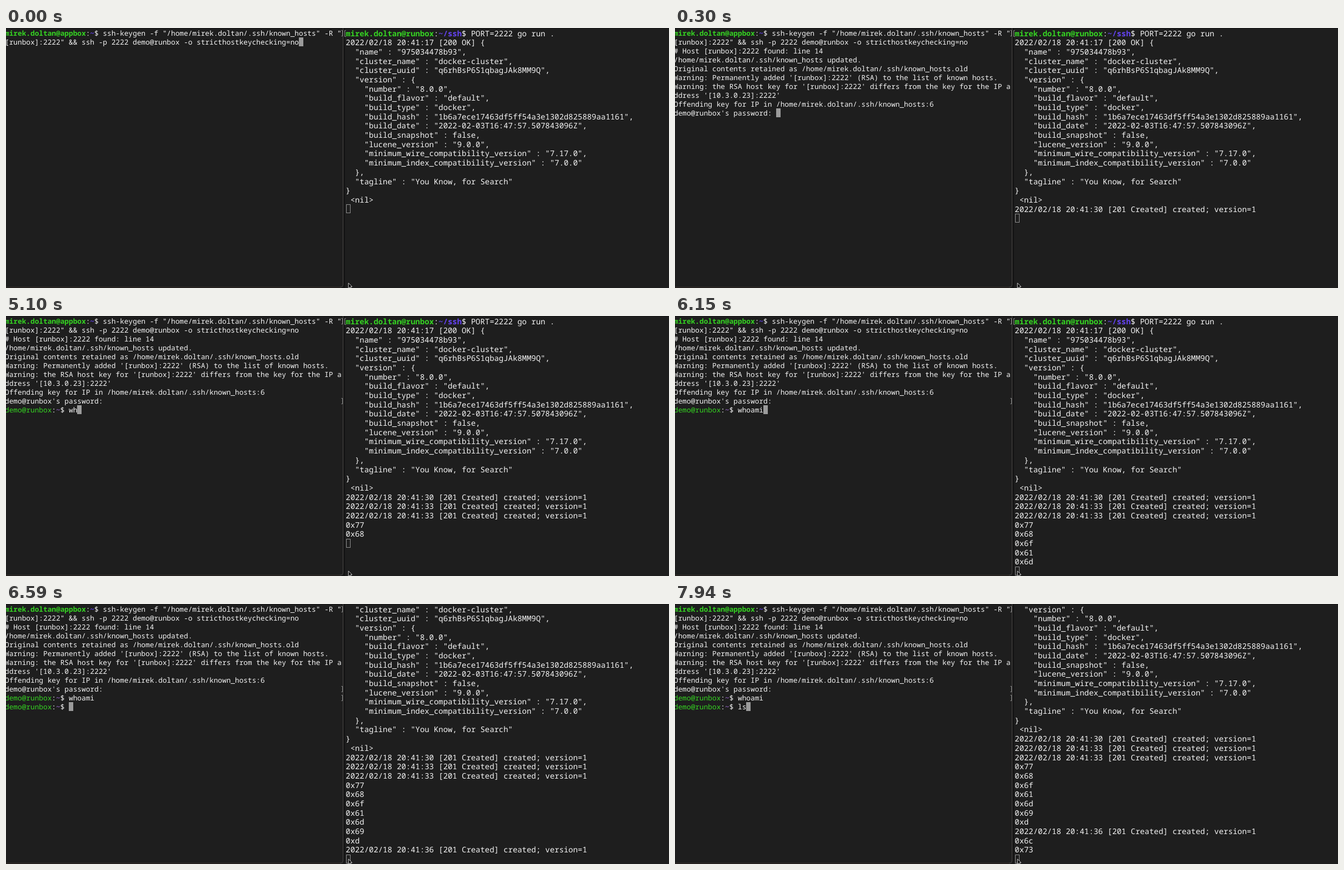
An HTML page with a canvas for the animation above (8 s loop, 1193x469 px).

```html
<!DOCTYPE html>
<html lang="en">
<head>
<meta charset="utf-8">
<title>Two terminals</title>
<style>
  html, body { margin: 0; width: 100%; height: 100%; overflow: hidden; background: #1e1e1e; }
  canvas { display: block; }
</style>
</head>
<body>
<canvas id="stage" width="1193" height="469"></canvas>
<script>
const ctx = document.getElementById('stage').getContext('2d');
const LOOP = 8000;
const WHITE = '#f4f4f4', GREEN = '#35d322', BLUE = '#6543f5', PURPLE = '#a66be0';

// Character grids of the two panes
const leftPane = { x: -2, y: 1, col: 7.667, row: 16.03, base: 12.7 };
const rightPane = { x: 611.3, y: 1.2, col: 8.35, row: 16.69, base: 13.3 };
const ROWS = 27;

const user = 'mirek.doltan', guest = 'demo@runbox';

// A line is a list of [text, colour, bold] runs
const plain = text => [[text, WHITE]];
const prompt = (who, dir, cmd, bold, dirColor) => [
  [who, GREEN, bold], [':', WHITE], [dir, dirColor, bold], ['$ ' + cmd, WHITE]
];
const shell = cmd => prompt(guest, '~', cmd, false, PURPLE);

const session = [
  prompt(`${user}@appbox`, '~', `ssh-keygen -f "/home/${user}/.ssh/known_hosts" -R "`, true, BLUE),
  ...`[runbox]:2222" && ssh -p 2222 ${guest} -o stricthostkeychecking=no
# Host [runbox]:2222 found: line 14
/home/${user}/.ssh/known_hosts updated.
Original contents retained as /home/${user}/.ssh/known_hosts.old
Warning: Permanently added '[runbox]:2222' (RSA) to the list of known hosts.
Warning: the RSA host key for '[runbox]:2222' differs from the key for the IP a
ddress '[10.3.0.23]:2222'
Offending key for IP in /home/${user}/.ssh/known_hosts:6
${guest}'s password: `.split('\n').map(plain)
];

const created = sec => `2022/02/18 20:41:${sec} [201 Created] created; version=1`;
const hex = text => [...text].map(c => '0x' + c.charCodeAt(0).toString(16));

const log = [
  prompt(`${user}@runbox`, '~/ssh', 'PORT=2222 go run .', true, BLUE),
  ...`2022/02/18 20:41:17 [200 OK] {
  "name" : "975034478b93",
  "cluster_name" : "docker-cluster",
  "cluster_uuid" : "q6rhBsP6S1qbagJAk8MM9Q",
  "version" : {
    "number" : "8.0.0",
    "build_flavor" : "default",
    "build_type" : "docker",
    "build_hash" : "1b6a7ece17463df5ff54a3e1302d825889aa1161",
    "build_date" : "2022-02-03T16:47:57.507843096Z",
    "build_snapshot" : false,
    "lucene_version" : "9.0.0",
    "minimum_wire_compatibility_version" : "7.17.0",
    "minimum_index_compatibility_version" : "7.0.0"
  },
  "tagline" : "You Know, for Search"
}
 <nil>`.split('\n').map(plain),
  ...[created(30), created(33), created(33), ...hex('whoami\r'), created(36), ...hex('ls')].map(plain)
];

// [start ms, session lines, shell commands, log lines]
const steps = [
  [0, 2, [], 19],
  [300, 10, [], 20],
  [3600, 10, [''], 22],
  [5100, 10, ['wh'], 24],
  [5250, 10, ['who'], 25],
  [6000, 10, ['whoam'], 25],
  [6150, 10, ['whoami'], 27],
  [6290, 10, ['whoami'], 28],
  [6590, 10, ['whoami', ''], 30],
  [7940, 10, ['whoami', 'ls'], 32]
];

function drawLine(pane, line, row) {
  const size = pane.col / 0.6;
  let col = 0;
  for (const [text, color, bold] of line) {
    ctx.font = `${bold ? 700 : 500} ${size}px "Noto Sans Mono", "Liberation Mono", monospace`;
    ctx.fillStyle = color;
    // Each character sits in its own terminal cell
    for (const ch of text) {
      if (ch !== ' ') ctx.fillText(ch, pane.x + col * pane.col, pane.y + row * pane.row + pane.base);
      col++;
    }
  }
  return col;
}

function bracket(x, y, height, dir) {
  ctx.strokeStyle = '#8c8c8c';
  ctx.lineWidth = 1;
  ctx.beginPath();
  ctx.moveTo(x - 2 * dir, y);
  ctx.lineTo(x, y);
  ctx.lineTo(x, y + height);
  ctx.lineTo(x - 2 * dir, y + height);
  ctx.stroke();
}

function drawFrames() {
  ctx.fillStyle = '#1e1e1e';
  ctx.fillRect(0, 0, 1193, 469);
  ctx.fillStyle = '#151515';
  ctx.fillRect(607, 0, 3, 469);
  ctx.fillRect(0, 468, 610, 1);
  ctx.fillRect(0, 0, 1193, 1);
  ctx.strokeStyle = '#4b4947';
  ctx.lineWidth = 1;
  ctx.beginPath();
  ctx.moveTo(606.5, 0);
  ctx.lineTo(606.5, 462);
  ctx.quadraticCurveTo(606.5, 467.5, 601, 467.5);
  ctx.stroke();
  ctx.fillStyle = '#3a332e';
  ctx.fillRect(0, 467, 601, 1);
}

function drawSession(count, commands) {
  const p = leftPane;
  const lines = [...session.slice(0, count), ...commands.map(shell)];
  const last = lines.length - 1;
  let end = 0;
  lines.forEach((line, row) => { end = drawLine(p, line, row); });
  ctx.fillStyle = '#9b9b9b';
  ctx.fillRect(Math.round(p.x + end * p.col), Math.round(p.y + last * p.row), 8, 16);
  bracket(605.5, 4.5, 10, 1);
  for (let row = 9; row < last; row++) bracket(605.5, Math.round(p.y + row * p.row) + 3.5, 10, 1);
}

function drawLog(count) {
  const p = rightPane;
  const top = Math.max(0, count - ROWS);
  log.slice(top, count).forEach((line, row) => drawLine(p, line, row));
  if (!top) bracket(609.5, 4.5, 11, -1);
  ctx.strokeStyle = '#8f8f8f';
  ctx.lineWidth = 1;
  ctx.strokeRect(612.5, Math.round(p.y + (count - top) * p.row) + 0.5, 7, 15);
}

function drawPointer(x, y) {
  ctx.beginPath();
  ctx.moveTo(x, y);
  ctx.lineTo(x, y + 9.5);
  ctx.lineTo(x + 2.2, y + 7.4);
  ctx.lineTo(x + 4, y + 11);
  ctx.lineTo(x + 5.2, y + 10);
  ctx.lineTo(x + 3.8, y + 6.8);
  ctx.lineTo(x + 6.6, y + 6.6);
  ctx.closePath();
  ctx.fillStyle = '#000';
  ctx.fill();
  ctx.strokeStyle = '#e8e8e8';
  ctx.lineWidth = 0.9;
  ctx.stroke();
}

function draw(now) {
  const t = now % LOOP;
  const [, count, commands, logged] = steps.findLast(step => step[0] <= t);
  ctx.textRendering = 'geometricPrecision';
  drawFrames();
  drawSession(count, commands);
  drawLog(logged);
  drawPointer(616.2, 460);
}

const start = performance.now();
function tick() {
  draw(performance.now() - start);
  requestAnimationFrame(tick);
}
tick();
</script>
</body>
</html>
```
